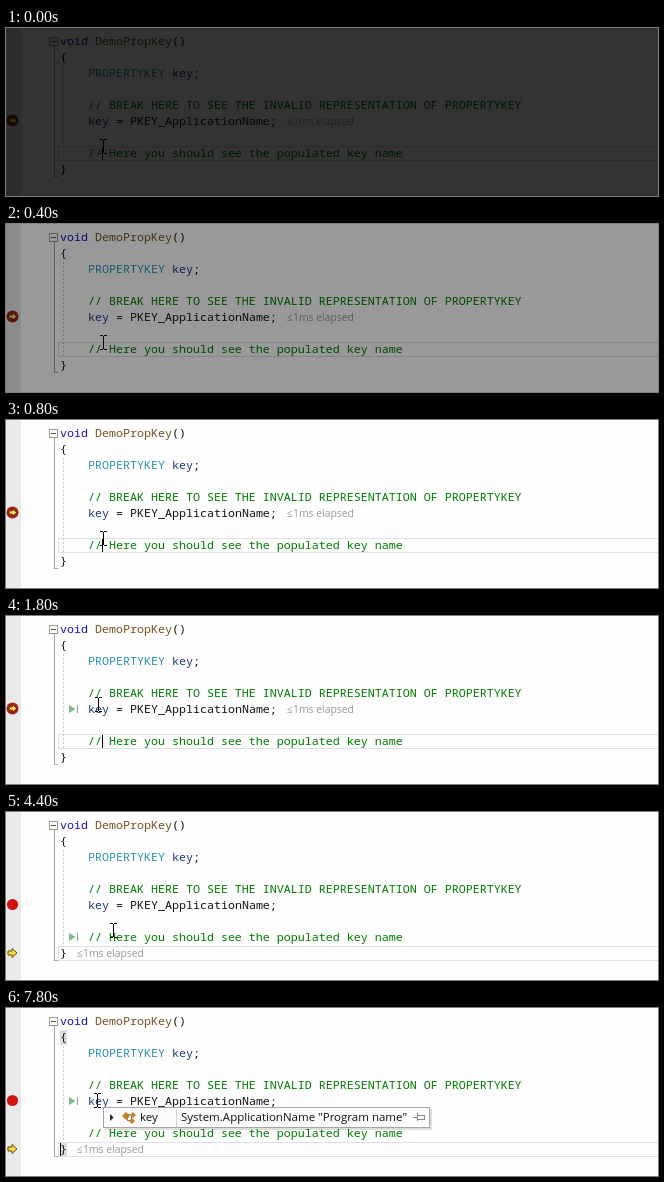
Animation of 652x168 px, one loop 8 s. Source, as an HTML page with a canvas:

```html
<!DOCTYPE html>
<html lang="en">
<head>
<meta charset="utf-8">
<title>Debugger key preview</title>
<style>
  html, body { margin: 0; width: 100%; height: 100%; overflow: hidden; background: #fff; }
  canvas { display: block; }
</style>
</head>
<body>
<canvas id="stage" width="652" height="168"></canvas>
<script>
const ctx = document.getElementById('stage').getContext('2d');
const LOOP = 8000, TICK = 200;
const CODE_FONT = '11.667px "Noto Sans Mono", "DejaVu Sans Mono", monospace';
const UI_FONT = '11.5px "Open Sans", "Noto Sans", sans-serif';
const HINT_FONT = '10.4px "Open Sans", "Noto Sans", sans-serif';
const GREEN = '#007a00', NAVY = '#1f377f', BLACK = '#111';

// Code runs: row, column, text, colour
const CODE = [
  [0, 0, 'void', '#1414b4'], [0, 5, 'DemoPropKey', '#74531f'], [0, 16, '()', BLACK],
  [1, 0, '{', BLACK],
  [2, 4, 'PROPERTYKEY', '#2b91af'], [2, 16, 'key', NAVY], [2, 19, ';', BLACK],
  [4, 4, '// BREAK HERE TO SEE THE INVALID REPRESENTATION OF PROPERTYKEY', GREEN],
  [5, 4, 'key', NAVY], [5, 8, '= PKEY_ApplicationName;', BLACK],
  [7, 4, '// Here you should see the populated key name', GREEN],
  [8, 0, '}', BLACK]
];

// Mouse path: time, x, y
const PATH = [
  [0, 97, 118], [1400, 97, 118], [1800, 92, 88], [2000, 90, 97], [3400, 90, 97],
  [3800, 94, 89], [4200, 107, 118], [5800, 107, 118], [6400, 91, 92], [LOOP, 91, 92]
];

function rect(x, y, w, h, color) {
  ctx.fillStyle = color;
  ctx.fillRect(x, y, w, h);
}

function frame(x, y, w, h, color) {
  ctx.strokeStyle = color;
  ctx.lineWidth = 1;
  ctx.strokeRect(x + .5, y + .5, w - 1, h - 1);
}

function text(str, x, y, font, color) {
  ctx.font = font;
  ctx.fillStyle = color;
  ctx.fillText(str, x, y);
}

function shape(points, fill, stroke) {
  ctx.beginPath();
  points.forEach(([x, y]) => ctx.lineTo(x, y));
  ctx.closePath();
  ctx.fillStyle = fill;
  ctx.fill();
  if (stroke) {
    ctx.strokeStyle = stroke;
    ctx.lineWidth = 1;
    ctx.stroke();
  }
}

function arrow(x, y, s, fill, stroke) {
  const outline = [[-4, -2], [0, -2], [0, -4.5], [5, 0], [0, 4.5], [0, 2], [-4, 2]];
  shape(outline.map(([px, py]) => [x + px * s, y + py * s]), fill, stroke);
}

function dot(x, y, r, color) {
  ctx.beginPath();
  ctx.arc(x, y, r, 0, Math.PI * 2);
  ctx.fillStyle = color;
  ctx.fill();
}

function mouseAt(t) {
  const i = PATH.findIndex(p => p[0] > t);
  const [t0, x0, y0] = PATH[i - 1], [t1, x1, y1] = PATH[i];
  const k = (t - t0) / (t1 - t0);
  return [Math.round(x0 + (x1 - x0) * k), Math.round(y0 + (y1 - y0) * k)];
}

const blink = (t, start) => (((t - start) % 1060) + 1060) % 1060 < 530;

function drawGutter(stepped) {
  rect(0, 0, 15, 168, '#e9e9ea');
  if (stepped) {
    dot(6.5, 92.5, 5.6, '#d41313');
    arrow(6, 141, 1, '#ffd83c', '#5f4c12');
  } else {
    dot(6.5, 92.5, 6, '#a3201a');
    arrow(6.5, 92.5, .85, '#ffe04a', '#6b2b0c');
  }
}

function drawOutline() {
  frame(43, 9, 9, 9, '#999');
  rect(45, 13, 5, 1, '#555');
  rect(48, 18, 1, 131, '#a8a8a8');
  rect(48, 148, 4, 1, '#a8a8a8');
  for (let y = 38; y < 133; y += 4) rect(57, y, 1, 2, '#c8c8c8');
}

function drawRunGlyph(y) {
  shape([[63, y - 4], [69.5, y], [63, y + 4]], '#7fb58a');
  rect(71, y - 4, 1, 8, '#8a9a8c');
}

function drawTooltip(x, width, value) {
  rect(x + 2, 101, width, 21, 'rgba(0,0,0,.13)');
  rect(x, 99, width, 21, '#fcfcfd');
  frame(x, 99, width, 21, '#a3a5ae');
  shape([[x + 7, 106], [x + 10.5, 109.5], [x + 7, 113]], '#222');
  // Linked struct icon
  ctx.strokeStyle = '#777';
  ctx.strokeRect(x + 24.5, 106.5, 4, 6);
  shape([[x + 19, 108], [x + 23, 104], [x + 27, 108], [x + 23, 112]], '#c58227');
  shape([[x + 27, 107], [x + 30, 104], [x + 33, 107], [x + 30, 110]], '#c58227');
  shape([[x + 26, 113], [x + 29, 110], [x + 32, 113], [x + 29, 116]], '#c58227');
  text('key', x + 37, 113, UI_FONT, BLACK);
  rect(x + 73, 101, 1, 18, '#d0d1d6');
  text(value, x + 78, 113, UI_FONT, BLACK);
  // Pin
  const px = x + width - 17;
  rect(px, 109, 5, 1, '#888');
  rect(px + 4, 105, 1, 8, '#888');
  frame(px + 4, 107, 8, 5, '#888');
}

function drawMouse([x, y]) {
  rect(x, y - 6, 1, 13, '#000');
  for (const end of [y - 7, y + 7]) {
    rect(x - 3, end, 3, 1, '#000');
    rect(x + 1, end, 3, 1, '#000');
  }
}

function draw(t) {
  const stepped = t >= 4200;
  rect(0, 0, 652, 168, '#fefefe');
  drawGutter(stepped);
  frame(52, stepped ? 134 : 118, 602, 15, '#dfdfe6');
  if (t >= 4800) {
    rect(54, 22, 7, 15, '#dcdcdc');
    rect(54, 135, 7, 13, '#dcdcdc');
  }
  drawOutline();
  for (const [row, col, str, color] of CODE) {
    text(str, 54 + col * 7, 17 + row * 16, CODE_FONT, color);
  }
  text('≤1ms elapsed', stepped ? 71 : 281, stepped ? 145 : 97, HINT_FONT, '#999');

  if (stepped) {
    if (blink(t, 4600)) rect(54, 135, 1, 13, '#000');
  } else if (t < 400 || blink(t, 2600)) {
    rect(96, 119, 1, 13, '#000');
  }

  if (t >= 1800 && t < 3800 || t >= 6200) drawRunGlyph(93);
  else if (stepped) drawRunGlyph(125);
  if (t >= 2200 && t < 3800) drawTooltip(96, 136, 'Invalid');
  if (t >= 6600) drawTooltip(97, 327, 'System.ApplicationName "Program name"');
  drawMouse(mouseAt(t));

  const shade = Math.max(0, .8 - t / 1000);
  if (shade > 0) rect(0, 0, 652, 168, `rgba(0,0,0,${shade})`);
}

const start = performance.now();
function tick() {
  const t = (performance.now() - start) % LOOP;
  draw(Math.floor(t / TICK) * TICK);
  requestAnimationFrame(tick);
}
tick();
</script>
</body>
</html>
```
